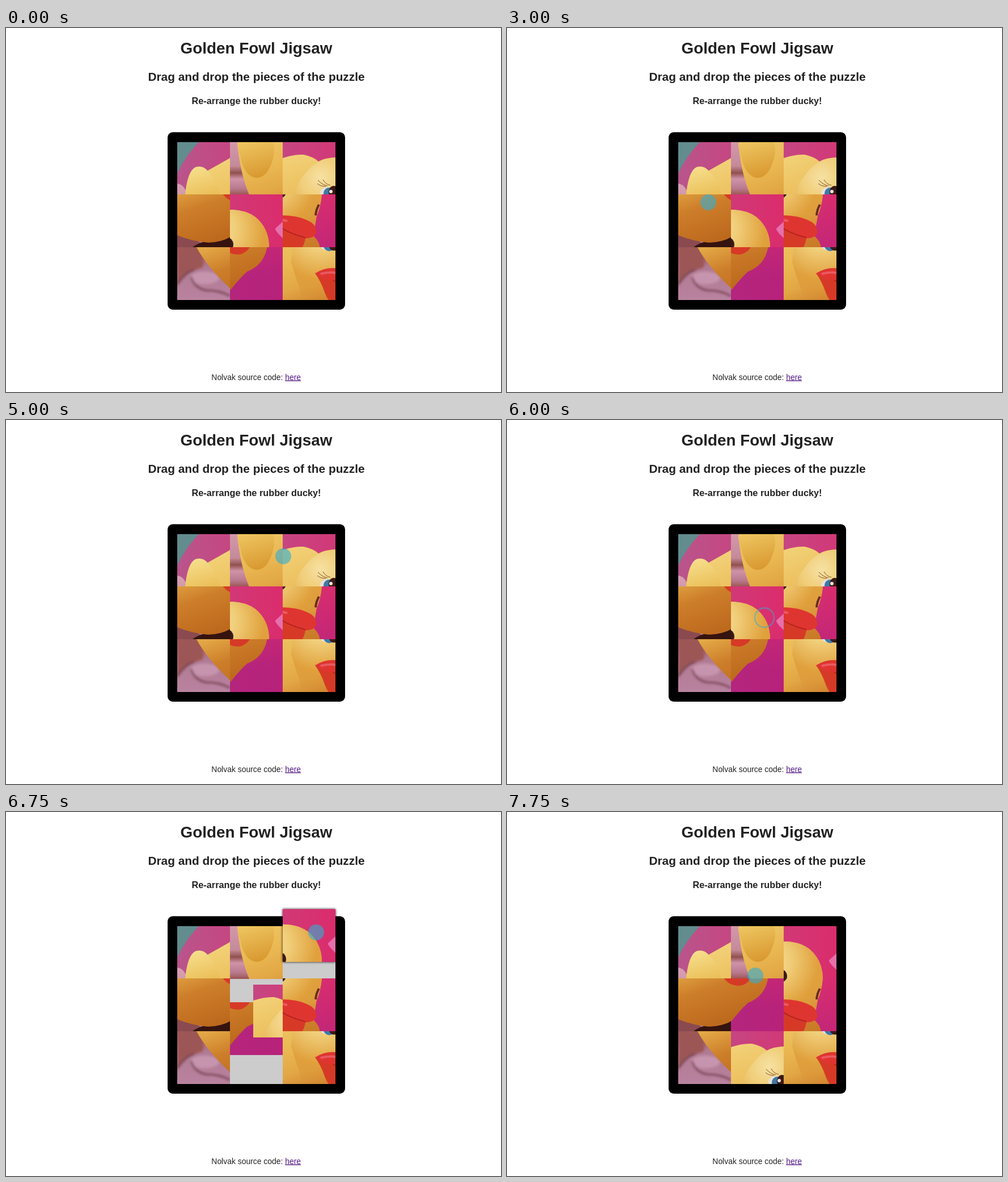
Write an HTML page that moves like this. It is 873 px wide and 641 px high and loops after 8000 ms.

```html
<!DOCTYPE html>
<html lang="en">
<head>
<meta charset="utf-8">
<title>Jigsaw</title>
<style>
html, body { margin: 0; width: 100%; height: 100%; overflow: hidden; background: #fff; }
#stage { display: block; font-family: "Liberation Sans", Arial, sans-serif; fill: #222; }
.h { font-weight: bold; }
.mid { text-anchor: middle; }
.link { fill: #551a8b; text-decoration: underline; }
</style>
</head>
<body>
<svg id="stage" width="873" height="641" viewBox="0 0 873 641">
  <defs>
    <linearGradient id="bg"><stop stop-color="#b9558c"/><stop offset=".5" stop-color="#cc3f7c"/><stop offset="1" stop-color="#db2c6c"/></linearGradient>
    <linearGradient id="dusk" x2="0" y2="1"><stop offset=".3" stop-color="#b01d80" stop-opacity="0"/><stop offset=".85" stop-color="#a81d80" stop-opacity=".7"/></linearGradient>
    <linearGradient id="skin" gradientUnits="userSpaceOnUse" x1="0" y1="70" x2="0" y2="279">
      <stop stop-color="#d9a0b4"/><stop offset=".31" stop-color="#c58a9a"/><stop offset=".37" stop-color="#92514f"/>
      <stop offset=".42" stop-color="#cf93a8"/><stop offset=".5" stop-color="#b97a8e"/><stop offset=".56" stop-color="#9c5553"/>
      <stop offset=".72" stop-color="#b07a92"/><stop offset="1" stop-color="#b983a0"/>
    </linearGradient>
    <linearGradient id="body" gradientUnits="userSpaceOnUse" x1="80" y1="20" x2="165" y2="265">
      <stop stop-color="#f3d47c"/><stop offset=".4" stop-color="#eab953"/><stop offset=".58" stop-color="#e2a645"/>
      <stop offset=".75" stop-color="#cd7e2a"/><stop offset="1" stop-color="#bd691d"/>
    </linearGradient>
    <radialGradient id="head" gradientUnits="userSpaceOnUse" cx="160" cy="62" r="125">
      <stop stop-color="#f6e1a2"/><stop offset=".3" stop-color="#f0cd78"/>
      <stop offset=".7" stop-color="#e0a03c"/><stop offset="1" stop-color="#d68a30" stop-opacity="0"/>
    </radialGradient>
    <linearGradient id="tail" gradientUnits="userSpaceOnUse" x1="20" y1="45" x2="50" y2="156">
      <stop stop-color="#f6df8e"/><stop offset=".45" stop-color="#ecc25d"/><stop offset="1" stop-color="#d9982f"/>
    </linearGradient>
    <filter id="soft" x="-20%" y="-20%" width="140%" height="140%"><feGaussianBlur stdDeviation="2.2"/></filter>
    <g id="pic">
      <path fill="url(#bg)" d="M0 0H279V279H0Z"/>
      <path fill="url(#dusk)" d="M0 0H279V279H0Z"/>
      <path fill="#628c8d" d="M0 0H38Q14 25 0 55Z"/>
      <path fill="url(#skin)" d="M0 73Q12 74 18 93L60 190L140 258V279H0Z"/>
      <g filter="url(#soft)">
        <path fill="#9c5654" d="M0 184H36Q52 210 44 222Q18 228 0 250Z"/>
        <ellipse cx="48" cy="240" rx="26" ry="11" fill="#c694ae"/>
        <path fill="none" stroke="#74404f" stroke-width="3" d="M0 252Q14 230 30 226M24 238Q32 260 52 262Q76 262 93 272"/>
      </g>
      <path fill="#8a4a50" d="M93 250L150 279H93Z"/>
      <path fill="#35130f" d="M120 279Q134 267 186 260V279Z"/>
      <path id="duck" fill="url(#body)" d="M13 95Q18 148 34 186Q52 220 93 258Q120 269 148 271Q174 270 188 260Q202 242 216 229Q245 218 251 188Q253 178 240 166L246 131Q253 115 255 93Q255 60 231 40Q215 28 190 27Q168 27 156 34Q148 26 130 22Q114 21 93 28L54 50Z"/>
      <path fill="url(#head)" d="M108 120Q110 80 133 55Q154 27 190 27Q215 28 231 40Q255 60 255 93Q253 115 246 131L240 166L220 190H130Z"/>
      <path fill="url(#tail)" d="M13 100Q18 43 37 43Q47 42 54 51Q78 76 78 112Q70 155 47 156Q27 154 20 125Z"/>
      <path fill="#e66fac" d="M279 48L266 60Q265 64 279 77Z"/>
      <ellipse cx="173" cy="89" rx="14" ry="10" fill="#e9e1d6"/>
      <circle cx="175" cy="90" r="10" fill="#3f78a5"/>
      <ellipse cx="183" cy="88" rx="9" ry="11" fill="#3a1a14"/>
      <circle cx="178" cy="87" r="3" fill="#eee4df"/>
      <path fill="none" stroke="#80502c" d="M172 77Q164 76 155 67M169 78Q160 78 154 73M177 76Q168 74 164 66"/>
      <path fill="none" stroke="#6b2b22" stroke-width="4" d="M250 111Q245 119 244 130"/>
      <path fill="#d63a26" d="M150 139Q160 152 168 175Q178 200 201 199Q224 196 227 164Z"/>
      <path fill="#df3530" d="M150 139Q168 128 186 130Q215 130 236 142Q249 152 244 164Q236 173 215 170Q195 160 182 151Q162 152 150 139Z"/>
      <path fill="none" stroke="#b5251f" stroke-width="2" d="M182 151Q200 163 226 169"/>
      <path fill="none" stroke="#ea5a62" stroke-width="4" d="M160 140Q178 135 194 140"/>
    </g>
  </defs>
  <g class="mid h">
    <text x="441.5" y="44.5" font-size="27.86">Golden Fowl Jigsaw</text>
    <text x="441.5" y="93" font-size="20.85">Drag and drop the pieces of the puzzle</text>
    <text x="441.5" y="134.3" font-size="16.29">Re-arrange the rubber ducky!</text>
  </g>
  <rect x="285" y="183.5" width="313" height="312.5" rx="9" fill="#000"/>
  <rect x="302.5" y="201" width="278.5" height="278" fill="#ccc"/>
  <g id="tiles"></g>
  <circle id="dot"/>
  <text class="mid" x="441.2" y="619.5" font-size="13.92">Nolvak source code: <tspan class="link">here</tspan></text>
</svg>
<script>
const NS = 'http://www.w3.org/2000/svg', SIZE = 93, LOOP = 8000, STEP = 250, TEAL = '#36acd1';
const tiles = document.getElementById('tiles'), dot = document.getElementById('dot');

function set(el, attrs) {
  for (const k in attrs) el.setAttribute(k, attrs[k]);
  return el;
}
const add = (parent, name, attrs) => set(parent.appendChild(document.createElementNS(NS, name)), attrs);
const place = (el, [x, y]) => set(el, { x: Math.round(x), y: Math.round(y) });
const slot = i => [302 + SIZE * (i % 3), 200.6 + 92.7 * Math.floor(i / 3)];
const mix = (a, b, p) => a.map((v, k) => v + (b[k] - v) * p);
const span = (t, start, length) => Math.min(1, Math.max(0, (t - start) / length));
const easeOut = u => 1 - (1 - u) ** 2;

// Picture cell in each slot; the tiles that move lie above those they cross
const shuffled = [0, 3, 1, 7, 2, 5, 6, 8, 4];
const DRAGGED = 4, TOP = 2, BOTTOM = 7;
const pieces = [];
let shadow;
for (const i of [0, 1, 3, 6, BOTTOM, TOP, 5, 8, DRAGGED]) {
  const cell = shuffled[i];
  if (i === DRAGGED) shadow = add(tiles, 'rect', { width: SIZE, height: SIZE, fill: '#000', filter: 'url(#soft)' });
  pieces[i] = add(tiles, 'svg', {
    width: SIZE, height: SIZE,
    viewBox: [cell % 3 * SIZE, Math.floor(cell / 3) * SIZE, SIZE, SIZE].join(' ')
  });
  add(pieces[i], 'use', { href: '#pic' });
  place(pieces[i], slot(i));
}

// Pointer strokes: start, length, then a curve of start, bend and end point
const strokes = [
  [1250, 750, [464, 242], [454, 275], [349, 305]],
  [3000, 500, [355, 307], [451, 334], [423, 333]],
  [4000, 250, [422.5, 347.5], [423, 342], [423, 336]],
  [4750, 250, [465, 276], [477, 258], [489, 240]],
  [5250, 750, [489, 240], [445, 342], [454, 348]],
  [6000, 500, [454, 348], [465, 280], [544, 216]],
  [6500, 250, [544, 216], [546, 214], [547, 212]],
  [7250, 500, [547, 212], [459, 350], [438, 288]]
];
// Taps show a growing, fading ring: start, length
const taps = [[4000, 750], [6000, 250], [7000, 500]];
const GRAB = 6250, SWAP = 6500, RELEASE = 6750, REST = 7250;

function pointer(t) {
  const [start, length, a, b, c] = strokes.findLast(s => s[0] <= t) || strokes[0];
  const u = span(t, start, length);
  return mix(mix(a, b, u), mix(b, c, u), u);
}

function draggedAt(t) {
  if (t < GRAB) return slot(DRAGGED);
  const [x, y] = pointer(Math.min(t, RELEASE));
  return mix([x - 59, y - 41], slot(TOP), easeOut(span(t, RELEASE, REST - RELEASE)));
}

function drawPointer(t) {
  const [cx, cy] = pointer(t);
  const tap = taps.find(([start, length]) => t >= start && t < start + length);
  const age = tap ? (t - tap[0]) / STEP : 0;
  set(dot, tap
    ? { cx, cy, r: 17 + age, fill: 'none', stroke: TEAL, 'stroke-width': 2, opacity: .6 - .2 * age }
    : { cx, cy, r: 14, fill: TEAL, stroke: 'none', opacity: t < 1000 ? 0 : .62 });
}

function drawTiles(t) {
  const p = easeOut(span(t, SWAP, REST - SWAP));
  place(pieces[TOP], mix(slot(TOP), slot(BOTTOM), p));
  place(pieces[BOTTOM], mix(slot(BOTTOM), slot(DRAGGED), p));
  place(pieces[DRAGGED], draggedAt(t));
  place(shadow, draggedAt(t));
  set(shadow, { opacity: t >= GRAB && t < REST ? .9 : 0 });
}

// The picture is held for each quarter second
let shown;
function draw(now) {
  const t = Math.floor(now % LOOP / STEP) * STEP;
  if (t !== shown) {
    shown = t;
    drawPointer(t);
    drawTiles(t);
  }
  requestAnimationFrame(draw);
}
draw(0);
</script>
</body>
</html>
```
